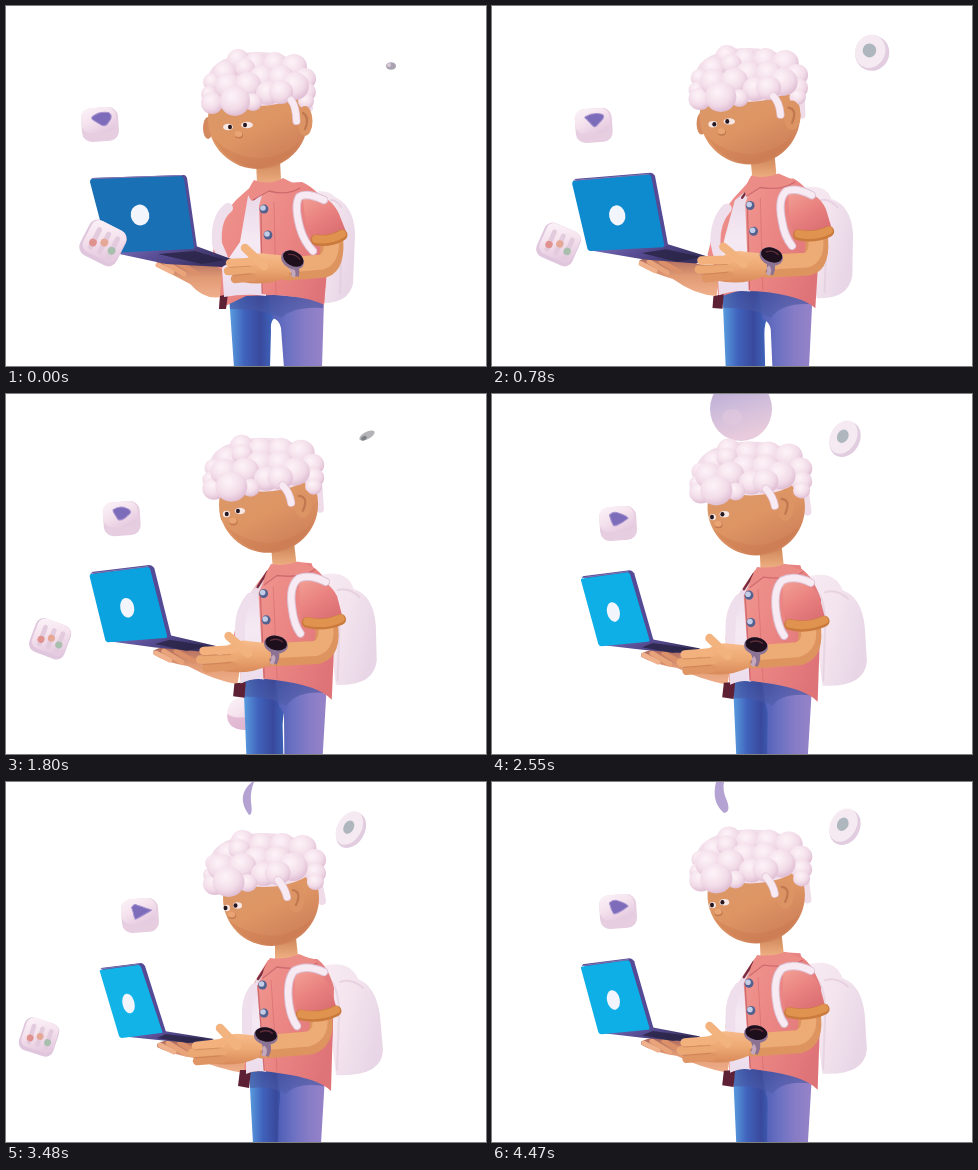
Write an HTML page that moves like this. It is 480 px wide and 360 px high and loops after 4500 ms.

```html
<!DOCTYPE html>
<html lang="en">
<head>
<meta charset="utf-8">
<title>Student with laptop</title>
<style>
html, body { margin: 0; width: 100%; height: 100%; overflow: hidden; background: #fff; }
svg { display: block; width: 100vw; height: 100vh; }
</style>
</head>
<body>
<svg id="stage" viewBox="0 0 480 360" fill="none" stroke-linecap="round" stroke-linejoin="round"></svg>
<script>
const NS = 'http://www.w3.org/2000/svg';
const stage = document.getElementById('stage');
const LOOP = 4500, STEP = 30;
const morphs = [], toggles = [];

// An attribute given as three strings is blended over the turn: front, half, side.
function add(parent, tag, attrs) {
  const el = document.createElementNS(NS, tag);
  for (const [name, v] of Object.entries(attrs)) {
    if (Array.isArray(v)) morphs.push({ el, name, parts: v.map(s => String(s).match(/-?[\d.]+/g).map(Number)), text: String(v[0]) });
    else el.setAttribute(name, v);
  }
  parent.appendChild(el);
  return el;
}
const path = (p, d, attrs) => add(p, 'path', { d, ...attrs });
const oval = (p, cx, cy, rx, ry, fill, attrs) => add(p, 'ellipse', { cx, cy, rx, ry, fill, ...attrs });
const group = (transform, p = stage) => add(p, 'g', { transform });
const line = (p, d, stroke, width, attrs) => path(p, d, { stroke, 'stroke-width': width, ...attrs });
const during = (el, ...spans) => { toggles.push({ el, spans }); return el; };

const defs = add(stage, 'defs', {});
function gradient(id, tag, geo, ...colors) {
  const g = add(defs, tag, { id, ...geo });
  colors.forEach((c, i) => add(g, 'stop', { offset: i / (colors.length - 1), 'stop-color': c }));
}
const linear = (id, x2, y2, ...c) => gradient(id, 'linearGradient', { x1: 0, y1: 0, x2, y2 }, ...c);
const radial = (id, ...c) => gradient(id, 'radialGradient', { cx: .4, cy: .33, r: .68 }, ...c);
radial('puff', '#fdf3f7', '#f8e8f0', '#f1dae7', '#dfbdd3');
linear('face', .5, 1, '#cf8d64', '#dc9868', '#de9564', '#d0825a');
linear('neck', 0, 1, '#cd8557', '#f0b184');
linear('skin', 0, 1, '#f7bb8b', '#eda973', '#d98a5a');
linear('farSkin', 0, 1, '#a9655c', '#e09a74', '#f0b08c');
linear('shirt', 1, .6, '#f0968f', '#ea8583', '#df7478');
linear('sleeve', .6, 1, '#f3a096', '#e98280', '#da6d72');
linear('tee', 0, 1, '#e8d6e6', '#f5eaf4', '#ecdcec');
linear('pack', 1, .5, '#f8ebf2', '#f3e4ee', '#e8d6e6');
linear('legA', 1, 0, '#5a9fe0', '#4062bc', '#39499c', '#3f6cc4');
linear('legB', 1, 0, '#4a5cb4', '#6a70c2', '#877cc6', '#9683c8');
linear('hips', 0, 1, '#3c478f', '#4e5daa');
linear('base', 1, .3, '#7c70bc', '#574c92', '#39305f');
linear('cube', .6, 1, '#fcf3f8', '#f5e3ee', '#e6cbe0');
linear('ball', .3, 1, '#b4a3d0', '#cdbbdb', '#e8cbdc');

// Lilac balloon above the head
const ball = group(['translate(122 15)', 'translate(195 15)', 'translate(268 15)']);
oval(ball, 0, 0, 31, 32, 'url(#ball)');
oval(ball, -9, 8, 10, 8, '#e3cbe0', { opacity: .5 });
during(ball, [2190, 3000]);
const sliver = path(stage, 'M0 0', { fill: '#b3a2d2' });
during(sliver, [3000, LOOP]);

// Pink cube passing behind the legs
const low = group(['translate(167 320)', 'translate(219 320)', 'translate(271 320)']);
path(low, 'M-16-2Q-14-17 2-17Q17-16 17-2Q17 15 1 16Q-17 15-16-2Z', { fill: 'url(#cube)' });
path(low, 'M-16 0Q-4 8 17-2Q16 15 1 16Q-17 15-16 0Z', { fill: '#dba5c6', opacity: .6 });
during(low, [1260, 2400]);

// Backpack
path(stage, [
  'M300 187Q322 182 329 191Q348 200 349 228L347 278Q342 298 315 297Z',
  'M312 181Q338 175 344 194Q364 200 366 230L366 268Q362 293 328 291Z',
  'M316 184Q344 177 352 197Q370 204 374 234L377 268Q376 295 330 293Z'], { fill: 'url(#pack)' });
line(stage, [
  'M318 197Q334 198 336 226L334 288', 'M322 194Q334 200 334 230L332 286', 'M324 198Q333 206 333 234L331 288'],
  '#dec8da', 2, { opacity: .5 });
line(stage, ['M325 194Q331 194 335 201', 'M330 195Q340 192 350 202', 'M334 200Q346 196 357 206'], '#e3cbdc', 2, { opacity: .7 });

// Jeans
path(stage, [
  'M223 289L270 288L270 311Q264 314 265 324L264 362L228 362Z',
  'M234 284L280 284L278 310Q275 320 275 330L276 362L237 362Z',
  'M243 288L284 288L280 310Q277 322 277 330L276 362L247 362Z'], { fill: 'url(#legA)' });
path(stage, [
  'M262 288L318 294L316 362L278 362L275 322Q273 313 266 312Z',
  'M268 284L321 290L317 362L280 362L279 324Q278 316 272 313Z',
  'M270 288L319 294L315 362L272 362L273 326Q274 316 274 312Z'], { fill: 'url(#legB)' });
path(stage, [
  'M223 286L318 292L317 302Q288 300 275 312Q262 304 224 303Z',
  'M234 282L321 286L320 298Q290 296 280 312Q264 302 235 302Z',
  'M243 286L319 290L318 304Q290 300 280 312Q266 304 244 306Z'], { fill: 'url(#hips)', opacity: .6 });

// Far arm
path(stage, [
  'M151 256Q160 249 178 253L224 262L218 290Q200 296 184 278Q165 268 151 260Z',
  'M147 255Q160 248 178 252L232 264L228 290Q205 287 181 272Q160 268 147 259Z',
  'M151 262Q164 255 184 258L242 270L238 291Q212 287 188 276Q164 272 151 265Z'], { fill: 'url(#farSkin)' });
['M152 259L166 266', 'M160 257L178 268', 'M172 257L190 267'].forEach((d, i) => line(
  group(['translate(0 0)', 'translate(-3 -1)', 'translate(2 4)']), d, ['#f0b28c', '#e8a37a', '#dc9069'][i], 5));

// Shirt, tee and straps
path(stage, [
  'M250 176L230 194L210 218L206 258L216 264L213 303L240 290L268 289Q306 290 318 298L322 240L300 180L275 172Z',
  'M261 174L246 192L230 214L221 246L230 266L231 288L250 284Q310 286 324 303L326 240L306 176L290 168Z',
  'M262 178L252 194L242 212L238 246L240 270L238 290L258 289Q312 290 325 308L327 240L312 178L290 173Z'], { fill: 'url(#shirt)' });
path(stage, [
  'M214 290L222 288L220 303L213 303Z', 'M225 290L236 288L235 303L224 302Z', 'M234 288L245 288L243 306L232 304Z'], { fill: '#5e2034' });
path(stage, [
  'M242 190L260 182L260 290Q240 287 218 291L216 262L234 236Z',
  'M244 196L260 180L258 285Q246 283 231 289L230 262L234 228Z',
  'M250 198L261 184L260 290Q250 287 240 292L240 262L241 230Z'], { fill: 'url(#tee)' });
line(stage, [
  'M222 202Q209 212 211 238L217 252', 'M240 203Q229 216 229 236L230 246', 'M249 206Q240 216 241 236L241 250'], '#efdfec', 10);
path(stage, [
  'M259 178L296 176Q314 184 326 208L318 299Q304 291 268 289L256 288L253 200Z',
  'M262 174L304 172Q318 180 330 206L325 304Q312 290 268 285L257 284L253 198Z',
  'M263 180L311 177Q322 184 328 206L325 309Q312 296 272 291L258 289L251 204Z'], { fill: 'url(#shirt)' });
line(stage, ['M255 200L256 287', 'M255 198L258 283', 'M252 204L258 288'], '#b84f5c', 1.2, { opacity: .6 });
line(stage, ['M260 180L248 193', 'M261 177L251 192', 'M262 182L252 197'], '#7a2d3e', 2.4);
line(stage, ['M268 196L270 288', 'M268 192L271 284', 'M265 198L271 289'], '#c75a63', 1, { opacity: .4 });

// Neck and collar
path(stage, [
  'M250 154L274 154L275 174Q264 184 251 177Z',
  'M262 150L286 150L288 169Q276 174 264 172Z',
  'M269 156L290 156L292 174Q282 178 269 177Z'], { fill: 'url(#neck)' });
path(stage, [
  'M248 174Q264 180 277 172L295 181Q280 190 262 185L246 195Q238 188 248 174Z',
  'M263 169Q277 172 290 167L307 174Q296 184 270 181L257 190Q254 184 263 169Z',
  'M264 176Q280 178 293 172L312 180Q300 189 271 185L256 196Q256 188 264 176Z'], { fill: '#ec8c87' });
line(stage, [
  'M247 194L263 185Q281 190 294 182', 'M257 190L270 181Q294 184 306 175', 'M257 196L271 185Q298 189 311 181'], '#bd5660', 1.3, { opacity: .6 });
for (const [cx, cy] of [[['258', '258', '256.5'], ['203', '199', '203']], [['262', '261', '258'], ['229', '225', '231']]]) {
  oval(stage, cx, cy, 4.4, 4.6, '#53618f');
  oval(stage, cx.map(x => x - 1), cy.map(y => y - 1), 2.8, 2.8, '#c3cce6');
}

// Laptop
path(stage, [
  'M104 246L190 240L228 254L216 261L160 258Z',
  'M98 245L169 239L213 251L200 257L150 253Z',
  'M113 254L158 249L208 257L198 262L152 258Z'], { fill: 'url(#base)' });
path(stage, [
  'M152 248L189 245L219 254L196 258Z', 'M149 248L168 244L206 251L182 256Z', 'M151 256L160 252L200 257L182 261Z'], { fill: '#292345', opacity: .8 });
path(stage, [
  'M86 172L178 169Q180 169 181 172L191 241L186 244Z',
  'M83 175L150 168Q153 168 155 171L170 240L164 243Z',
  'M95 186L135 181Q137 181 139 184L160 250L153 252Z'], { fill: '#554a96' });
path(stage, [
  'M86 173L175 170Q177 170 178 173L188 241Q188 243 186 243L105 247Q103 247 102 245L84 176Q84 173 86 173Z',
  'M83 177L148 170Q150 170 151 172L166 240Q166 242 164 242L99 246Q97 246 96 244L81 180Q81 177 83 177Z',
  'M95 188L132 183Q134 183 135 185L156 249Q157 251 155 251L116 256Q114 256 113 254L94 190Q93 188 95 188Z'],
  { fill: ['rgb(26,112,180)', 'rgb(10,152,216)', 'rgb(18,180,232)'] });
line(stage, ['M86 172.5L176 169.5', 'M82.5 176.5L149 169.5', 'M95 187L133 182'], '#7f79b4', 1);
oval(stage, 0, 0, ['9.3', '7.5', '6'], ['10.5', '10', '10'], '#f3f5fc', {
  transform: ['translate(134 209) rotate(-10)', 'translate(122.5 211) rotate(-12)', 'translate(122.5 221.5) rotate(-14)'] });

// Near arm, sleeve and cuff
line(stage, [
  'M325 226Q329 256 318 260L282 263', 'M322 226Q327 254 314 258L270 260', 'M314 230Q319 256 304 261L256 265'], '#de945f', 23);
line(stage, [
  'M325 226Q328 252 316 256L282 259', 'M321 226Q326 250 312 254L270 256', 'M313 230Q318 252 302 257L256 261'], '#edab76', 15);
path(stage, [
  'M297 192Q322 184 333 208L341 228Q326 238 306 234Q298 216 297 192Z',
  'M295 186Q322 180 333 202L339 224Q324 234 300 230Q295 212 295 186Z',
  'M289 192Q314 184 325 206L331 228Q316 238 292 234Q288 216 289 192Z'], { fill: 'url(#sleeve)' });
const cuff = ['M310 234Q325 236 336 229', 'M304 228Q321 232 336 225', 'M295 233Q313 237 330 229'];
line(stage, cuff, '#c97a3c', 11);
line(group('translate(0 -1)'), cuff, '#e0934f', 8);

// Near hand
path(stage, [
  'M238 255Q248 245 262 248L282 250L283 270Q262 281 236 276Z',
  'M222 253Q236 243 248 246L268 248L268 270Q246 281 218 275Z',
  'M208 260Q224 250 234 252L254 254L254 275Q232 286 204 281Z'], { fill: 'url(#skin)' });
const fingers = [
  [['M246 256L224 257', 'M232 254L203 255', 'M216 261L190 264'], '#f2b17d'],
  [['M246 264L222 265', 'M232 263L200 264', 'M216 270L186 271'], '#eba873'],
  [['M246 271L229 273', 'M232 270L207 273', 'M216 277L191 279'], '#df9564'],
  [['M258 260L239 242', 'M247 258L227 241', 'M231 264L214 246'], '#f2b37f']];
for (const [d, color] of fingers) line(stage, d, color, 8.5);
line(stage, ['M244 260L224 261.5', 'M230 259L202 260', 'M214 266L189 268'], '#bd7249', 1, { opacity: .45 });
line(stage, ['M244 268L226 269.5', 'M230 267L203 269', 'M214 274L188 276'], '#bd7249', 1, { opacity: .45 });

// Watch
line(stage, ['M283 252Q291 260 289 270', 'M270 250Q277 258 272 268', 'M256 256Q264 264 259 273'], '#8d7292', 8, { 'stroke-linecap': 'butt' });
line(stage, ['M284 262Q289 265 287 271', 'M271 261Q274 264 270 269', 'M257 265Q261 268 257 274'], '#c3a7bb', 4, { 'stroke-linecap': 'butt' });
const watch = group(['translate(287 253) rotate(28)', 'translate(275 249) rotate(14)', 'translate(260 253) rotate(10)']);
oval(watch, 0, 1, 12, 8.8, '#8a7394');
oval(watch, 0, -.5, 11, 7.2, '#1d0f1c');
line(watch, 'M-6-2Q0-6 6-3', '#5d2e3b', 1.4);

// Head
const puff = (p, x, y, r) => oval(p, x, y, r, r, 'url(#puff)');
oval(stage, ['202', '214', '228'], ['122', '117', '122'], 5, 11, '#d48a5e');
line(stage, ['M301 90L303 102', 'M311 90L312 112', 'M312 98L316 119'], '#efdce8', 8);
oval(stage, ['252', '260.5', '265'], ['113', '109', '116'], ['50', '50', '48'], ['50', '49', '48'], 'url(#face)');
path(stage, [
  'M207 132Q222 158 250 162Q280 160 294 136Q276 152 250 152Q224 150 207 132Z',
  'M217 130Q232 154 260 157Q292 154 303 130Q284 146 260 148Q234 146 217 130Z',
  'M222 138Q238 160 265 163Q294 160 307 136Q290 152 265 154Q240 152 222 138Z'], { fill: '#c36f43', opacity: .25 });

// Backpack strap over the shoulder
const strap = [
  'M318 194Q300 186 293 191Q288 200 294 222Q298 236 307 245',
  'M320 188Q305 180 294 184Q284 191 288 214Q290 230 297 239',
  'M318 190Q300 182 288 189Q280 199 283 222Q285 236 291 244'];
line(stage, strap, '#dcc3d6', 8.5);
line(stage, strap, '#f7eaf2', 6.5);

const hairMove = dx => [`translate(0 0) scale(1 1)`, `translate(${-8.7 - dx * .45} -4) scale(1.05 1)`, `translate(${-11.6 - dx} 5) scale(1.07 1)`];
const back = group(hairMove(0)), front = group(hairMove(11));
oval(back, 252, 73, 50, 27, '#f2deea');
[[232, 54, 11], [250, 58, 12], [269, 58, 12], [288, 61, 13], [299, 73, 11], [219, 67, 12], [206, 76, 9],
 [203, 88, 8], [300, 86, 10], [300, 95, 8], [206, 97, 11]].forEach(b => puff(back, ...b));
[[239, 62, 10], [256, 72, 13], [275, 72, 13], [289, 80, 14], [222, 80, 13], [242, 79, 13], [262, 87, 12],
 [247, 96, 9], [229, 95, 15], [275, 86, 12]].forEach(b => puff(front, ...b));

// Face details
const eyes = [
  [['222', '220.5', '221'], ['121', '118.5', '126'], ['5', '4', '3'], ['224', '221.5', '219.5']],
  [['241', '235.5', '231.5'], ['119', '115.5', '123.5'], ['6', '5.5', '4.5'], ['239', '233.5', '229.5']]];
for (const [x, y, rx, pupil] of eyes) {
  oval(stage, x, y, rx, 3.2, '#f6e6e4');
  oval(stage, pupil, y, 2, 2.3, '#251720');
}
oval(stage, ['233', '228.5', '226'], ['129', '126.5', '133.5'], 4.2, 3.6, '#c47a50');
oval(stage, ['232.5', '228', '225.5'], ['128', '125.5', '132.5'], 3.8, 3, '#e9a473');
oval(stage, ['299', '299', '290'], ['115', '108.5', '116'], ['7.5', '9', '8.5'], ['15', '14.5', '14'], '#dc9464');
line(stage, ['M297 107Q304 111 299 123', 'M295 101Q305 102 299 116', 'M287 108Q296 110 290 123'], '#b8704a', 2.2, { opacity: .8 });
const burn = ['M285 94Q290 100 290.5 115', 'M279 90Q286 97 287 108', 'M272 98Q279 106 281 115'];
line(stage, burn, '#e3c7d9', 8);
line(stage, burn, '#f8eaf2', 6.5);

// Floating cubes
const play = group(['translate(94 118) rotate(-4)', 'translate(108 121) rotate(-4)', 'translate(134 133) rotate(-4)']);
add(play, 'rect', { x: -18.5, y: -16.5, width: 37, height: 34, rx: 10, fill: '#e6cde0' });
add(play, 'rect', { x: -18.5, y: -16.5, width: 35, height: 25, rx: 9, fill: 'url(#cube)' });
path(play, [
  'M-7-8Q0-13 9-11Q13-9 11-4L7 1Q4 3 1 1L-6-4Q-9-6-7-8Z',
  'M-8-9Q0-13 7-10Q12-8 8-4L2 1Q-1 3-3 0L-7-6Q-9-8-8-9Z',
  'M-7-9Q-5-12-2-10L8-6Q12-4 8-2L-2 3Q-5 4-6 1L-7-6Q-8-8-7-9Z'], { fill: '#7d6cba', stroke: '#a693cf', 'stroke-width': 1 });

const mixer = group(['translate(97 237) rotate(27) scale(1.02)', 'translate(54 241) rotate(22) scale(.95)', 'translate(33 255) rotate(18) scale(.9)']);
add(mixer, 'rect', { x: -20, y: -19, width: 40, height: 38, rx: 9, fill: '#dfc6dd' });
add(mixer, 'rect', { x: -18, y: -19, width: 37, height: 34, rx: 8, fill: 'url(#cube)' });
[[-9, 4, '#e0928f'], [1, -1, '#e6a896'], [11, 3, '#a9bfae']].forEach(([x, y, c]) => {
  line(mixer, `M${x} -10L${x} 9`, '#e3cbde', 5);
  oval(mixer, x, y, 3.8, 3.8, c);
});
during(mixer, [0, 2460], [2640, 4440]);

const disc = group(['translate(390 58) rotate(10)', 'translate(371.5 43) rotate(25)', 'translate(344 47) rotate(30)']);
oval(disc, 1.5, .5, ['17', '16.5', '13.5'], ['18', '18', '19'], '#e2cde0');
oval(disc, -1, -.5, ['15', '14.5', '12'], ['17', '17', '18'], '#f6eaf2');
oval(disc, -2, -1, ['7', '6.5', '5'], ['7', '7', '7'], '#adb7bd');
during(disc, [30, 1290], [1410, 1770], [1860, LOOP]);
const chip = group('translate(385 60)');
oval(chip, 0, 0, 5, 3.8, '#aaa2b0');
oval(chip, -2, -1, 2, 2, '#d9cbd8');
during(chip, [0, 30]);
const shard = group('translate(361 41.5) rotate(-28)');
oval(shard, 0, 0, 8.5, 3.6, '#b4b3b8');
oval(shard, -4, 1, 3, 2, '#7d8086');
during(shard, [1770, 1860]);

// Turn of the figure: 0 front, 1 half, 2 side
const KEYS = [[0, 0], [780, .65], [1350, 1], [1800, 1.35], [2550, 1.74], [3480, 2], [4470, 1.74], [4500, 1.725]];
const slope = i => {
  const a = KEYS[Math.max(i - 1, 0)], b = KEYS[Math.min(i + 1, KEYS.length - 1)];
  return (b[1] - a[1]) / (b[0] - a[0]);
};
function turn(t) {
  const i = Math.max(0, KEYS.findIndex(k => k[0] > t) - 1);
  const [t0, a] = KEYS[i], [t1, b] = KEYS[i + 1], h = t1 - t0, u = (t - t0) / h, v = 1 - u;
  return v * v * (1 + 2 * u) * a + u * u * (3 - 2 * u) * b + h * u * v * (v * slope(i) - u * slope(i + 1));
}

function draw(t) {
  const q = turn(t), w = [(q - 1) * (q - 2) / 2, q * (2 - q), q * (q - 1) / 2];
  for (const { el, name, parts, text } of morphs) {
    let n = 0;
    const whole = name === 'fill';
    el.setAttribute(name, text.replace(/-?[\d.]+/g, () => {
      const v = parts.reduce((sum, p, k) => sum + p[n] * w[k], 0);
      n++;
      return ' ' + (whole ? Math.max(0, Math.round(v)) : v.toFixed(2));
    }));
  }
  for (const { el, spans } of toggles)
    el.setAttribute('visibility', spans.some(([a, b]) => t >= a && t < b) ? 'visible' : 'hidden');
  const k = Math.max(0, (t - 3480) / 990), m = (a, b) => (a + (b - a) * k).toFixed(1);
  sliver.setAttribute('d', `M${m(246, 224)} 0Q${m(229, 219)} ${m(14, 20)} ${m(243, 232)} ${m(33, 31)}` +
    `Q${m(247, 239)} ${m(33, 30)} ${m(245, 235)} ${m(20, 19)}Q${m(244, 230)} ${m(10, 8)} ${m(248, 232)} 0Z`);
}

const start = performance.now();
function tick() {
  const t = (performance.now() - start) % LOOP;
  draw(Math.floor(t / STEP) * STEP);
  requestAnimationFrame(tick);
}
tick();
</script>
</body>
</html>
```
